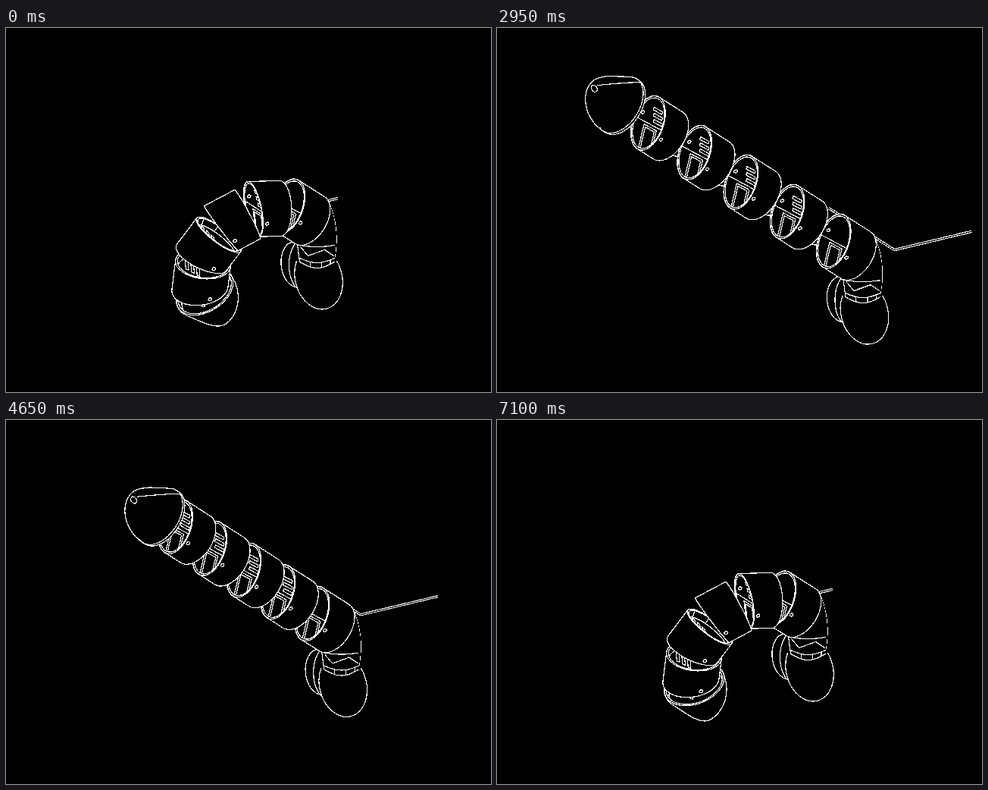
Write an HTML page with a canvas that moves like this. It is 640 by 480 pixels and loops after 7150 ms.

```html
<!DOCTYPE html>
<html lang="en">
<head>
<meta charset="utf-8">
<title>Segmented arm</title>
<style>
  html, body { margin: 0; width: 100%; height: 100%; overflow: hidden; background: #000; }
  canvas { display: block; width: 640px; height: 480px; }
</style>
</head>
<body>
<canvas id="stage" width="640" height="480"></canvas>
<script>
const g = document.getElementById('stage').getContext('2d', { willReadFrequently: true });
const LOOP = 7150, STEP = 50, STEPS = 20, JOINTS = 5;
const CURL = 32, LIFT = -4;
const PITCH = 48.16, R = 36.5, HEAD_R = 41;
const TAU = Math.PI * 2;

// Unit vectors of the unbent arm: x right, y down, z toward the viewer.
const AXIS = [-0.669, -0.426, 0.610];
const DOWN = [-0.654, 0.727, -0.210];
const SIDE = [0.354, 0.540, 0.765];
const ROOT = [375.4, 237, 0];
const UNIT = [32.2, 20.5, -29.4];

const clamp = x => Math.max(0, Math.min(1, x));
const mix = (p, a, q, b) => p.map((x, i) => x * a + q[i] * b);
const range = (n, f) => Array.from({ length: n }, (_, i) => f(i));

// ---- timing ----
function pose(t) {
  const [up, flat, apart, close, lift, curl] = [250, 1400, 2550, 3900, 5050, 6200]
    .map(start => Math.max(0, Math.min(STEPS, Math.floor((t - start) / STEP) + 1)));
  // Joints move one after another, each for an equal share of the steps.
  const turn = (n, j) => clamp(n * JOINTS / STEPS - j);
  const bends = range(JOINTS, j => {
    const back = JOINTS - 1 - j;
    return CURL + (LIFT - CURL) * (turn(up, back) - turn(curl, j)) +
      LIFT * (turn(lift, back) - turn(flat, j));
  });
  return { bends, gap: (apart - close) / STEPS };
}

// ---- drawing helpers ----
function trace(pts, closed) {
  g.beginPath();
  pts.forEach(p => g.lineTo(p[0], p[1]));
  if (closed) g.closePath();
}

function line(pts, closed) {
  trace(pts, closed);
  g.stroke();
}

function solid(pts) {
  trace(pts, true);
  g.fill();
  g.stroke();
}

function oval(x, y, rx, ry, tilt = 0) {
  g.beginPath();
  g.ellipse(x, y, rx, ry, tilt, 0, TAU);
  g.fill();
  g.stroke();
}

function hull(pts) {
  const half = list => {
    const out = [];
    for (const p of list) {
      while (out.length > 1) {
        const [a, b] = out.slice(-2);
        if ((b[0] - a[0]) * (p[1] - a[1]) > (b[1] - a[1]) * (p[0] - a[0])) break;
        out.pop();
      }
      out.push(p);
    }
    return out.slice(0, -1);
  };
  const s = pts.slice().sort((a, b) => a[0] - b[0] || a[1] - b[1]);
  return half(s).concat(half(s.reverse()));
}

// ---- parts ----
const at = (part, s, v, w) =>
  [0, 1].map(i => part.c[i] + part.u[i] * s + part.v[i] * v + SIDE[i] * w);

// Circle around the axis; slant tips its plane, flat squashes its upper half.
const loop = (part, s, r, slant = 0, flat = 1) => range(56, i => {
  const a = i / 56 * TAU, v = r * Math.cos(a);
  return at(part, s + slant * v, v < 0 ? v * flat : v, r * Math.sin(a));
});

const hole = (part, w) => line(range(14, i =>
  at(part, 2.4 * Math.cos(i / 14 * TAU), 2.4 * Math.sin(i / 14 * TAU), w)), true);

function inside(rim, drawInner) {
  line(rim, true);
  g.save();
  trace(rim, true);
  g.clip();
  drawInner();
  g.restore();
}

// Inner fittings are boxes in a skewed frame: p along the shelf, q across it.
function box(part, s, p0, p1, q0, q1) {
  const corner = (p, q) => at(part, s, 0.71 * q - 0.31 * p, 0.95 * p + 0.71 * q);
  line([corner(p0, q0), corner(p1, q0), corner(p1, q1), corner(p0, q1)], true);
}

function clips(part, s) {
  for (let k = 0; k < 3; k++) box(part, s, 3 - 3 * k, 24 - 3 * k, -8 * k - 9, -8 * k - 5);
}

function ring(part) {
  const slant = -0.214, rear = part.i ? -33 : -37;
  const front = loop(part, 6, R, slant), back = loop(part, rear, R);
  solid(hull(front.concat(back)));
  if (part.u[2] - slant * part.v[2] > 0) {
    line(front, true);
    inside(loop(part, 5.5, R - 2.5, slant), () => {
      box(part, 0, -40, 40, 0, 60);
      box(part, 0, -16, 14, 4, 60);
      box(part, 0, -12, 10, 7, 60);
      if (part.i) clips(part, 0);
      hole(part, -31);
    });
  }
  if (part.u[2] < 0) {
    line(back, true);
    rearInside(part, rear, R);
  }
  hole(part, 36);
}

function rearInside(part, s, r) {
  inside(loop(part, s, r - 2.5), () => {
    line(loop(part, s + 9, r - 4), true);
    for (let a = 0.25; a < TAU; a += 0.7) {
      const v = Math.cos(a), w = Math.sin(a);
      line([at(part, s, v * r, w * r), at(part, s + 9, v * (r - 4), w * (r - 4))]);
    }
    clips(part, s + 6);
  });
}

function head(part) {
  const rear = 14, rim = 18, len = 56;
  const slices = range(17, i => {
    const t = Math.sin(i / 16 * Math.PI / 2);
    return loop(part, rim + len * t, HEAD_R * (1 - t * t) ** 0.65, 0, 1 - 0.35 * Math.sqrt(t));
  });
  solid(hull(loop(part, rear, HEAD_R).concat(...slices)));
  if (part.u[2] < 0) {
    line(loop(part, rear, HEAD_R), true);
    rearInside(part, rear, HEAD_R);
    return;
  }
  line(loop(part, rim, HEAD_R).slice(0, 29));
  line(range(15, i => {
    const t = i / 15.4;
    return at(part, rim + len * t, -HEAD_R * (1 - 0.95 * t ** 1.1), 0);
  }));
  oval(...at(part, 69, 0, 0), 3.6, 4.8, -0.6);
}

function tab(part) {
  const [root, end] = part.i === JOINTS ? [14, 0] : [-31, -PITCH];
  solid([[root, -13], [end, -5], [end - 4, 0], [end, 5], [root, 13]]
    .map(([s, v]) => at(part, s, v, 33)));
  oval(...at(part, end, 0, 33), 2.2, 2.2);
}

function base(gap) {
  g.save();
  g.translate(UNIT[0] * 5 * gap, UNIT[1] * 5 * gap);
  oval(382, 311, 19.5, 30, -0.1);
  oval(390, 312, 17, 33);

  g.save();
  g.beginPath();
  g.rect(360, 306, 100, 80);
  g.clip();
  oval(412, 329, 31, 42, -0.25);
  g.restore();

  const band = (t, y, sag) => [387 + 46 * t, y + sag * Math.sin(Math.PI * t)];
  const upper = t => band(t, 303, 6), lower = t => band(t, 308, 8);
  const arc = f => range(13, i => f(i / 12));

  g.beginPath();
  g.moveTo(424, 226);
  g.quadraticCurveTo(441, 262, 433, 304);
  g.stroke();
  arc(lower).reverse().forEach(p => g.lineTo(...p));
  g.lineTo(384, 285);
  g.fill();

  line([[384, 285], [387, 308]]);
  line(arc(t => band(t, 286, 2)));
  line(arc(upper));
  line(arc(lower));
  [0.3, 0.63, 0.88].forEach(t => line([upper(t), lower(t)]));
  line([[388, 288], [398, 300], [420, 292], [432, 300]]);
  g.restore();
}

function cable(gap, bend) {
  const along = k => [422.5 + UNIT[0] * k, 227.6 + UNIT[1] * k];
  const knee = along(7 * gap), reach = 102 - 0.545 * bend;
  const path = [along(3 * gap - 0.9), knee, [knee[0] + reach, knee[1] - reach * 0.238]];
  g.save();
  g.lineWidth = 3.2;
  line(path);
  g.strokeStyle = '#000';
  g.lineWidth = 1.2;
  line(path);
  g.restore();
}

// ---- scene ----
function build(bends, gap) {
  let c = ROOT, deg = 0;
  return range(JOINTS + 1, i => {
    if (i) deg += bends[i - 1];
    const a = deg * Math.PI / 180, cos = Math.cos(a), sin = Math.sin(a);
    const u = mix(AXIS, cos, DOWN, sin), v = mix(DOWN, cos, AXIS, -sin);
    if (i && i < JOINTS) c = mix(c, 1, u, PITCH);
    const moved = mix(c, 1, UNIT, (5 - 2 * i) * gap);
    return { i, u, v, c: moved, z: moved[2] + u[2] * (i === JOINTS ? 35 : -13) };
  });
}

// Keep line edges hard: every pixel is either black or white.
function harden() {
  const image = g.getImageData(0, 0, 640, 480);
  const px = new Uint32Array(image.data.buffer);
  for (let i = 0; i < px.length; i++) px[i] = (px[i] & 255) > 112 ? 0xffffffff : 0xff000000;
  g.putImageData(image, 0, 0);
}

function draw(t) {
  const { bends, gap } = pose(t);
  const parts = build(bends, gap);
  g.fillStyle = '#000';
  g.strokeStyle = '#fff';
  g.lineWidth = 1.1;
  g.lineJoin = 'round';
  g.fillRect(0, 0, 640, 480);
  g.save();
  g.translate(0.5, 0.5);
  base(gap);
  cable(gap, bends.reduce((a, b) => a + b));
  parts.slice(1).forEach(tab);
  parts.sort((a, b) => a.z - b.z).forEach(p => p.i === JOINTS ? head(p) : ring(p));
  g.restore();
  harden();
}

function frame() {
  draw(performance.now() % LOOP);
  requestAnimationFrame(frame);
}
frame();
</script>
</body>
</html>
```
